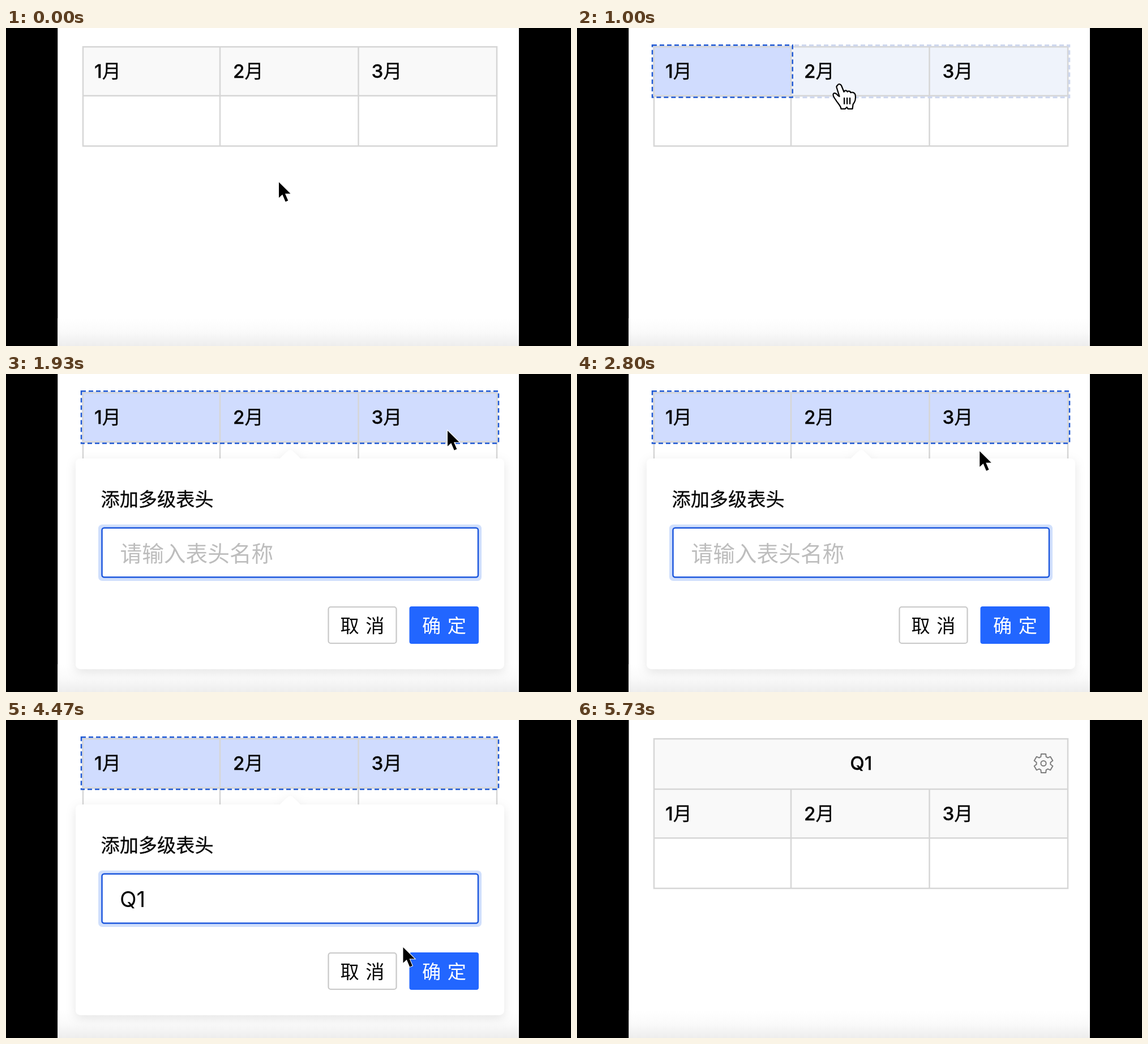
These frames come from a looping animation (998x561 px, 5870 ms). An HTML page:

```html
<!DOCTYPE html>
<html lang="zh-CN">
<head>
<meta charset="utf-8">
<title>多级表头</title>
<style>
  html, body { margin: 0; width: 100%; height: 100%; overflow: hidden; background: #000; }
  svg { display: block; width: 100%; height: 100%; }
  text { font-family: Inter, "Noto Sans CJK SC", "Noto Sans CJK", sans-serif; font-size: 33.2px; fill: #060606; }
  .head { font-weight: 500; stroke: #060606; stroke-width: .3; }
  .field { font-size: 38.7px; }
  .button { letter-spacing: 11.5px; }
  .line { fill: none; stroke: #d6d6d6; stroke-width: 2.5; }
  .dash { fill: none; stroke: #1f58d2; stroke-width: 2.5; stroke-dasharray: 8 5; }
  .faint { fill: none; stroke: #cfd8ee; stroke-width: 3.5; stroke-dasharray: 8 5; }
</style>
</head>
<body>
<svg viewBox="0 0 998 561" xmlns="http://www.w3.org/2000/svg">
  <defs>
    <linearGradient id="floor" x1="0" y1="0" x2="0" y2="1">
      <stop offset="0" stop-color="#fff"/>
      <stop offset=".5" stop-color="#fafafa"/>
      <stop offset="1" stop-color="#ededed"/>
    </linearGradient>
    <filter id="shadow" x="-10%" y="-10%" width="120%" height="125%">
      <feDropShadow dx="0" dy="5" stdDeviation="9" flood-color="#000" flood-opacity=".1"/>
    </filter>
    <g id="months" class="head">
      <text x="156" y="88">1月</text>
      <text x="401" y="88">2月</text>
      <text x="645.5" y="88">3月</text>
    </g>
    <g id="backdrop">
      <rect x="91.5" width="814.5" height="561" fill="#fff"/>
      <rect x="91.5" y="512" width="814.5" height="49" fill="url(#floor)"/>
    </g>
  </defs>

  <rect width="998" height="561"/>

  <!-- grouped header -->
  <g id="after">
    <use href="#backdrop"/>
    <rect x="136" y="33" width="731" height="175" fill="#f9f9f9"/>
    <path class="line" d="M136 33.2H867V297H136ZM136 122H867M136 208.2H867M378 122V297M622.5 122V297"/>
    <text class="head" x="502" y="88" text-anchor="middle">Q1</text>
    <use href="#months" y="89"/>
    <g transform="translate(824 76.5)" fill="none" stroke="#7d7d7d" stroke-width="2" stroke-linejoin="round">
      <path id="gear"/>
      <circle r="4.6"/>
    </g>
  </g>

  <!-- flat header with selection and dialog -->
  <g id="before">
    <use href="#backdrop"/>
    <rect x="136" y="33" width="731" height="86" fill="#f9f9f9"/>
    <rect id="fill1" x="134" y="31" width="244" height="91"/>
    <rect id="fill23" x="378" y="31" width="491" height="91"/>
    <path class="line" d="M136 33.2H867V208.2H136ZM136 119.5H867M378 33V208M622.5 33V208"/>
    <path id="faint1" class="faint" d="M133 30.8H380.5V122.3H133Z"/>
    <path id="faint23" class="faint" d="M384 30.8H869.5V122.3H384"/>
    <path id="dash1" class="dash" d="M133 30.3H380.7V122.3H133Z"/>
    <path id="dashAll" class="dash" d="M133 30.3H870V122.3H133Z"/>
    <use href="#months"/>
    <g id="dialog">
      <path filter="url(#shadow)" fill="#fff" d="M133 149H484L498.500 135.500Q502 132.500 505.500 135.500L520 149H870Q880 149 880 159V510.500Q880 520.500 870 520.500H133Q123 520.500 123 510.500V159Q123 149 133 149Z"/>
      <text class="head" x="167.500" y="233">添加多级表头</text>
      <rect x="163" y="265.500" width="677" height="99.500" rx="7" fill="#d0dffc"/>
      <rect x="169.500" y="271.500" width="664.500" height="87" rx="4" fill="#fff" stroke="#1c57dd" stroke-width="2.500"/>
      <text id="hint" class="field" x="201.500" y="330.500" style="fill:#bdbdbd">请输入表头名称</text>
      <text id="value" class="field" x="201" y="330">Q1</text>
      <rect x="569.500" y="411" width="120" height="64" rx="4" fill="#fff" stroke="#c8c8c8" stroke-width="2.200"/>
      <text class="button" x="590.500" y="456">取消</text>
      <rect id="confirm" x="712.500" y="410" width="122.500" height="66" rx="4"/>
      <text class="button" x="735" y="456" style="fill:#fff">确定</text>
    </g>
  </g>

  <g id="cursor">
    <path id="arrow" d="M0 0V27.500L6.300 21.700L11.700 34.500L16.300 32.500L11 20.200H20.500Z" fill="#000" stroke="#fff" stroke-width="2" paint-order="stroke"/>
    <g id="hand" stroke="#000" stroke-width="2.200" stroke-linejoin="round" stroke-linecap="round">
      <path fill="#fff" d="M-3 2C-2 -.5 2 -.3 3.500 3L8 14C9 11 13 11 14 14C15 12 19 12 20 15.500C22 14 27 15 28 19C29 24 28 31 24 36L23 44H15L13 41L10 44H3C2 38 -3 34 -6 29C-9 25 -12 21 -11 18C-10 15 -6 16 -3 20L0 22L-5 6C-5.500 4 -4.500 3 -3 2Z"/>
      <path fill="none" d="M8.500 25V35M13.500 25V35M18.500 25V35"/>
    </g>
  </g>
</svg>
<script>
const LOOP = 5870;
const $ = id => document.getElementById(id);
const show = (id, on) => $(id).setAttribute('opacity', Number(on));
const ramp = (t, a, b) => Math.min(1, Math.max(0, (t - a) / (b - a)));
const smooth = u => u * u * (3 - 2 * u);
const mix = (a, b, u) => a + (b - a) * u;

// start, end, target x, target y
const moves = [
  [40, 590, 290, 98],
  [740, 1390, 780, 100],
  [2640, 3230, 404, 298],
  [3980, 4650, 765, 423]
];

function pointer(t) {
  let x = 482, y = 272;
  for (const [from, to, tx, ty] of moves) {
    const u = smooth(ramp(t, from, to));
    x = mix(x, tx, u);
    y = mix(y, ty, u);
  }
  return [x, y];
}

function gearPath() {
  const points = [];
  for (let k = 0; k < 6; k++) {
    const tooth = 30 + 60 * k;
    for (const [r, turn] of [[17, -14], [17, 14], [12.5, 22], [12.5, 38]]) {
      const a = (tooth + turn) * Math.PI / 180;
      points.push((r * Math.cos(a)).toFixed(2) + ' ' + (r * Math.sin(a)).toFixed(2));
    }
  }
  return 'M' + points.join('L') + 'Z';
}

function draw(t) {
  const [x, y] = pointer(t);
  const hover = t < 1000 && y < 120;
  const first = t >= 660;
  const all = t >= 1560;
  const typed = t >= 3265;
  const blue = '#d0dcfe', pale = '#eff3fb';

  $('fill1').setAttribute('fill', first ? blue : hover ? pale : 'none');
  $('fill23').setAttribute('fill', all ? blue : first ? pale : 'none');
  show('faint1', hover && !first);
  show('faint23', first && !all);
  show('dash1', first && !all);
  show('dashAll', all);

  show('dialog', ramp(t, 1850, 1925));
  show('hint', !typed);
  show('value', typed);
  const h = ramp(t, 4510, 4700);
  $('confirm').setAttribute('fill', `rgb(${mix(34, 84, h)},${mix(102, 139, h)},255)`);
  show('before', 1 - ramp(t, 5150, 5725));

  const pressing = (y < 120 && t < 1865) || (t > 4000 && x > 712);
  show('arrow', !pressing);
  show('hand', pressing);
  $('cursor').setAttribute('transform', `translate(${x.toFixed(2)} ${y.toFixed(2)})`);
  show('cursor', 1 - ramp(t, 5110, 5440));
}

$('gear').setAttribute('d', gearPath());
const start = performance.now();
function tick() {
  draw((performance.now() - start) % LOOP);
  requestAnimationFrame(tick);
}
tick();
</script>
</body>
</html>
```
